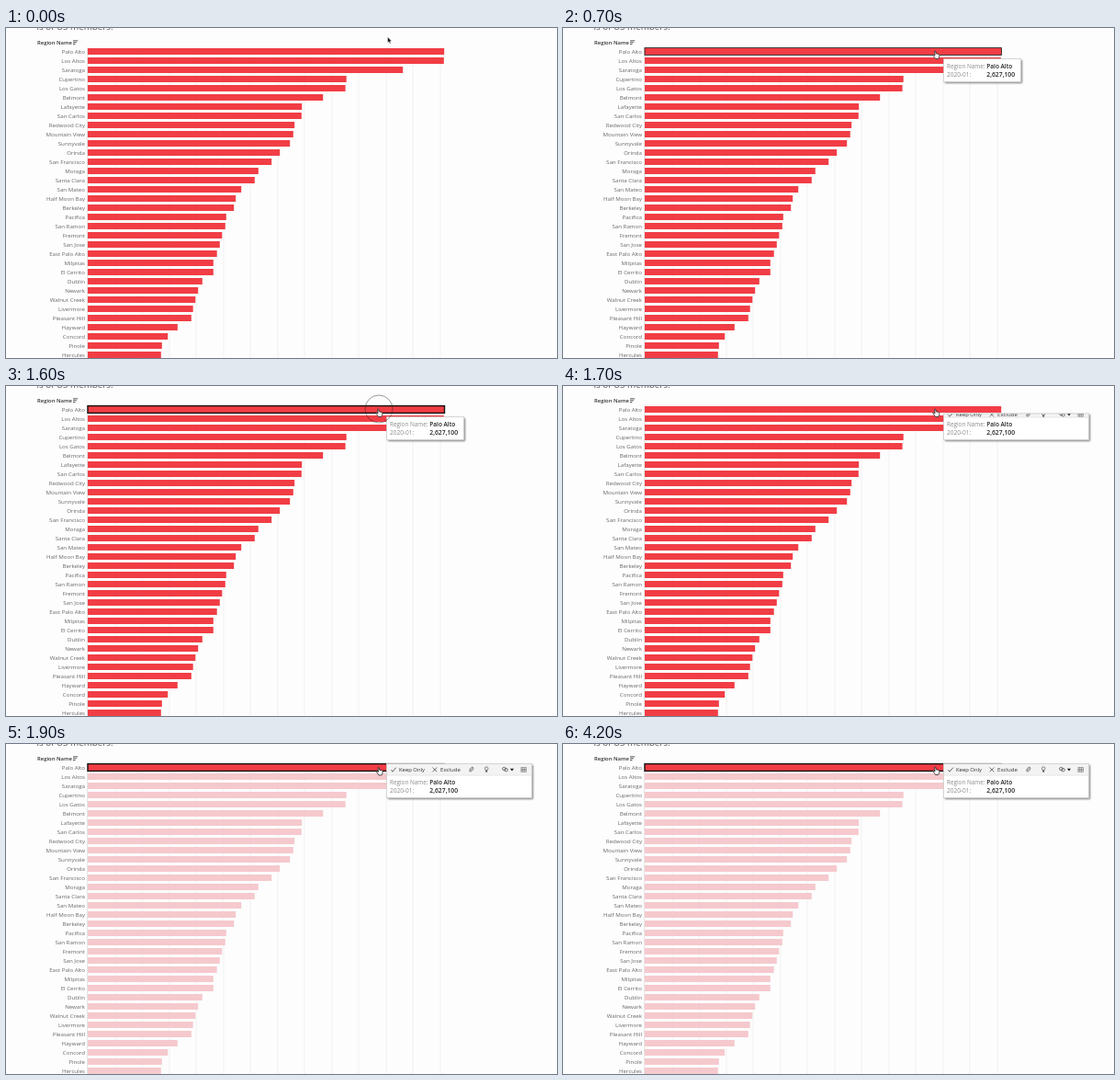
An HTML page with a canvas that plays this animation: 600x359 px, repeating every 4300 ms.

```html
<!DOCTYPE html>
<html lang="en">
<head>
<meta charset="utf-8">
<title>Region chart</title>
<style>
html, body { margin: 0; width: 100%; height: 100%; overflow: hidden; background: #fdfdfd; }
canvas { display: block; width: 600px; height: 359px; }
</style>
</head>
<body>
<canvas id="stage"></canvas>
<script>
const W = 600, H = 359, LOOP = 4300;
const FONT = '"Open Sans", "Noto Sans", sans-serif';
const RED = '#f13d45', PALE = '#f5c9cd', INK = '#333', BG = '#fdfdfd';
const X0 = 89, ROW0 = 25.5, PITCH = 10, BAR_H = 7;

const regions = ['Palo Alto', 'Los Altos', 'Saratoga', 'Cupertino', 'Los Gatos', 'Belmont',
  'Lafayette', 'San Carlos', 'Redwood City', 'Mountain View', 'Sunnyvale', 'Orinda',
  'San Francisco', 'Moraga', 'Santa Clara', 'San Mateo', 'Half Moon Bay', 'Berkeley',
  'Pacifica', 'San Ramon', 'Fremont', 'San Jose', 'East Palo Alto', 'Milpitas', 'El Cerrito',
  'Dublin', 'Newark', 'Walnut Creek', 'Livermore', 'Pleasant Hill', 'Hayward', 'Concord',
  'Pinole', 'Hercules'];
const ends = [477.2, 476.8, 432.2, 370.7, 369.6, 345.2, 322.2, 321.8, 314.2, 312.8, 309.2,
  298.2, 289.2, 274.8, 270.8, 256.2, 250.2, 248.2, 239.8, 238.8, 235.3, 232.8, 229.7, 225.8,
  225.8, 213.8, 209.2, 206.3, 203.7, 201.8, 186.8, 176.2, 169.8, 168.8];

const canvas = document.getElementById('stage');
const ctx = canvas.getContext('2d');
const dpr = window.devicePixelRatio || 1;
canvas.width = W * dpr;
canvas.height = H * dpr;

function text(str, x, y, size, color, weight = 400, align = 'left') {
  ctx.font = `${weight} ${size}px ${FONT}`;
  ctx.fillStyle = color;
  ctx.textAlign = align;
  ctx.fillText(str, x, y);
}

function rect(x, y, w, h, color) {
  ctx.fillStyle = color;
  ctx.fillRect(x, y, w, h);
}

function line(points, color, width) {
  ctx.beginPath();
  points.forEach(([x, y], i) => i ? ctx.lineTo(x, y) : ctx.moveTo(x, y));
  ctx.strokeStyle = color;
  ctx.lineWidth = width;
  ctx.stroke();
}

function ring(x, y, rx, ry, color, width, turn = 0) {
  ctx.beginPath();
  ctx.ellipse(x, y, rx, ry, turn, 0, Math.PI * 2);
  ctx.strokeStyle = color;
  ctx.lineWidth = width;
  ctx.stroke();
}

function drawChart(selected, outline) {
  rect(0, 0, W, H, BG);
  text('is of US members.', 33.5, 2.4, 9.8, '#555');
  text('Region Name', 34, 18, 5.9, INK, 600);
  [5.2, 3.8, 2.4].forEach((w, i) => rect(73, 13.4 + i * 1.9, w, 0.9, '#444'));

  for (let k = 1; k <= 13; k++) rect(Math.round(X0 + k * 29.54) - 0.5, 21, 1, H, '#f2f2f2');
  rect(88, 21, 1, H, '#e6e6e6');

  regions.forEach((name, i) => {
    const y = ROW0 + i * PITCH;
    text(name, 86, y + 2.1, 6.15, '#666', 400, 'right');
    rect(X0, y - BAR_H / 2, ends[i] - X0, BAR_H, selected && i ? PALE : RED);
  });
  if (outline) {
    ctx.strokeStyle = '#111';
    ctx.lineWidth = outline;
    ctx.strokeRect(X0, ROW0 - 3.9, ends[0] - X0 + 0.3, 7.8);
  }
}

function drawTools(dy) {
  const c = '#555';
  ctx.save();
  ctx.translate(0, dy);
  line([[419.3, 28.2], [421, 30.1], [424.8, 25.7]], c, 0.9);
  text('Keep Only', 428, 30.1, 5.9, INK);
  line([[464.5, 25.5], [469.3, 30.3]], c, 0.8);
  line([[469.3, 25.5], [464.5, 30.3]], c, 0.8);
  text('Exclude', 473, 30.1, 6.1, INK);
  // paper clip
  ring(506.8, 27.6, 1.4, 2.8, c, 0.8, 0.6);
  line([[507.5, 26.4], [506, 28.8]], c, 0.7);
  // light bulb
  ring(523.2, 26.7, 1.8, 1.9, c, 0.7);
  rect(522.3, 28.5, 1.8, 2.2, c);
  // joined sets with menu arrow
  ring(542.4, 27, 1.8, 1.7, c, 0.8);
  ring(544.6, 28.2, 1.8, 1.7, c, 0.8);
  ctx.beginPath();
  ctx.moveTo(548.9, 26.7);
  ctx.lineTo(553.1, 26.7);
  ctx.lineTo(551, 29.4);
  ctx.fillStyle = '#222';
  ctx.fill();
  // data grid
  for (let i = 0; i < 4; i++) rect(560.7, 25.4 + i * 1.5, 6, 0.6, '#777');
  for (let i = 0; i < 4; i++) rect(560.7 + i * 1.8, 25.4, 0.6, 5, '#777');
  ctx.restore();
}

function drawTip(top, right, toolShift) {
  const x = 414.5, bottom = 58.7, wide = toolShift !== null;
  ctx.save();
  ctx.shadowColor = 'rgba(0,0,0,.5)';
  ctx.shadowBlur = 2 * dpr;
  ctx.shadowOffsetX = ctx.shadowOffsetY = dpr;
  rect(x, top, right - x, bottom - top, '#fff');
  ctx.restore();
  if (wide) {
    ctx.save();
    ctx.beginPath();
    ctx.rect(x, top, right - x, 34 - top);
    ctx.clip();
    rect(x, top, right - x, 34 - top, '#f3f3f3');
    drawTools(toolShift);
    ctx.restore();
    rect(x, 33.7, right - x, 0.7, '#dcdcdc');
  }
  ctx.strokeStyle = '#c6c6c6';
  ctx.lineWidth = 0.7;
  ctx.strokeRect(x, top, right - x, bottom - top);
  text('Region Name:', 418, 44.1, 6.35, '#888');
  text('Palo Alto', 461.3, 44.1, 6.5, '#222', 600);
  text('2020-01:', 418, 52.9, 6.5, '#888');
  text('2,627,100', 461.3, 52.9, 6.8, '#222', 600);
}

function shape(points, x, y, fill, stroke, width) {
  ctx.save();
  ctx.translate(x, y);
  ctx.beginPath();
  points.forEach(([px, py]) => ctx.lineTo(px, py));
  ctx.closePath();
  ctx.lineJoin = 'round';
  ctx.fillStyle = fill;
  ctx.fill();
  ctx.strokeStyle = stroke;
  ctx.lineWidth = width;
  ctx.stroke();
  ctx.restore();
}

function drawArrow(x, y) {
  shape([[0, 0], [0, 6.2], [1.4, 5], [2.4, 7.2], [3.4, 6.8], [2.5, 4.6], [4.3, 4.5]],
    x, y, '#111', '#fff', 0.4);
}

function drawHand(x, y) {
  shape([[-0.6, 0], [0.5, 0], [0.9, 2.6], [3.6, 3.2], [4.6, 4.2], [4.2, 6.6], [3.4, 8.3],
    [0.2, 8.3], [-1, 6.4], [-2.6, 4.6], [-1.9, 3.9], [-0.3, 4.8]],
    x, y, '#fff', '#222', 0.8);
}

function draw(ms) {
  const t = Math.floor(ms / 100) * 100;
  const selected = t >= 1800;
  const pressed = t >= 1500 && t < 1700;
  let outline = 0;
  if (t >= 500 && t < 1500) outline = 0.8;
  else if (pressed || selected) outline = 1.4;

  ctx.setTransform(dpr, 0, 0, dpr, 0, 0);
  drawChart(selected, outline);

  if (selected) drawTip(21.5, 572.7, 0);
  else if (t >= 1700) drawTip(30, 572.7, 3.2);
  else if (t >= 700) drawTip(33.7, 498.7, null);

  if (pressed) {
    ctx.globalAlpha = t < 1600 ? 1 : 0.5;
    ring(406, 25, 15, 15, '#222', 0.9);
    ctx.globalAlpha = 1;
  }

  // glide from the blank header down onto the first bar
  const p = Math.min(1, Math.max(0, (t - 300) / 300));
  const ease = p * p * (3 - 2 * p);
  const x = 415.6 + (405.3 - 415.6) * ease;
  const y = 9.8 + (25.2 - 9.8) * ease;
  const drift = t >= 1900 && t < 4200 ? 0.4 : 0;
  if (t < 500) drawArrow(x, y);
  else drawHand(x + drift, y + drift);
}

const start = performance.now();
function tick() {
  draw((performance.now() - start) % LOOP);
  requestAnimationFrame(tick);
}
draw(0);
requestAnimationFrame(tick);
</script>
</body>
</html>
```
